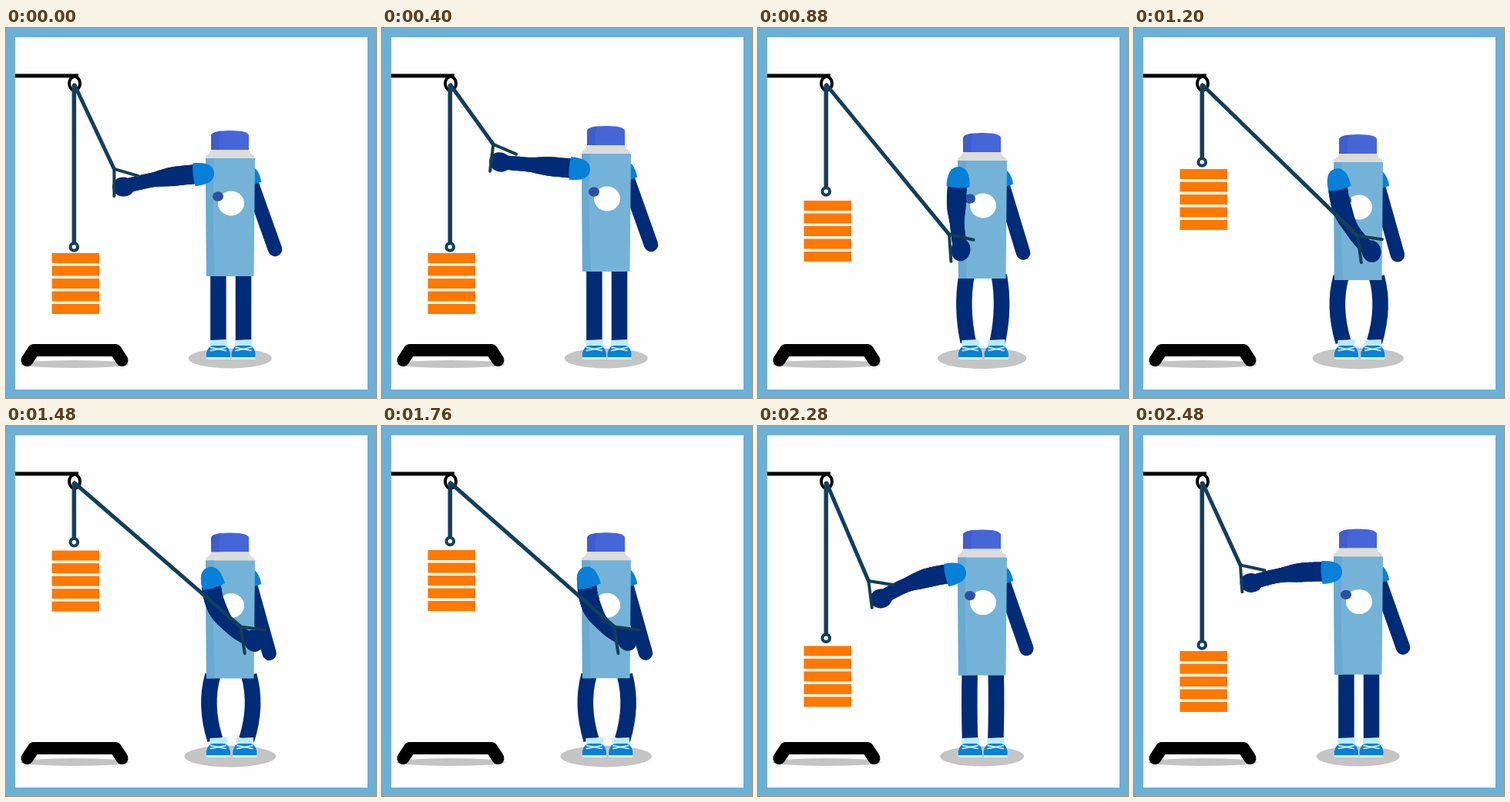
Animation of 480x480 px, one loop 2.52 s. Source, as an HTML page with a canvas:

```html
<!DOCTYPE html>
<html lang="en">
<head>
<meta charset="utf-8">
<title>Cable pull</title>
<style>
html, body { margin: 0; width: 100%; height: 100%; overflow: hidden; background: #6cb0d6; }
canvas { display: block; width: 480px; height: 480px; }
</style>
</head>
<body>
<canvas id="stage" width="480" height="480"></canvas>
<script>
const c = document.getElementById('stage').getContext('2d');
const LOOP = 2520, STEP = 40, RAD = Math.PI / 180;
const NAVY = '#002b76', BLUE = '#0780d8', ROPE = '#123f5c', STRAP = '#153e53';

// time, body drop, shoulder x, arm angle, arm reach, arm bend,
// knot offset x and y, handle turn, ring lift, brick lift, knee bow
const NAMES = ['drop', 'sx', 'angle', 'reach', 'bend', 'kx', 'ky', 'turn', 'ring', 'brick', 'bow'];
const KEYS = [
  [0, 0, 257, 80.8, 106, 3, -12, -23, 0, 0, 0, 0],
  [400, -6, 257, 95, 104, 0, -9, -23, 7, 0, 0, 0],
  [560, -3.5, 257, 74, 101, 2, -11, -22, 4, 5, 1, 1.5],
  [880, 3, 260, -1.8, 95, 4, -15, -20, -4, 72, 68, 8],
  [1200, 5, 264, -25, 104, 12, -18, -20, -8, 110, 109, 11.5],
  [1520, 5.5, 266, -34, 99, 17, -17, -18, -9, 134, 131, 12],
  [1760, 5.2, 266, -32.4, 97, 17, -17, -17, -9, 134.5, 131, 11.5],
  [2080, 3.4, 257, 42, 97, 8, -19, -21, -10, 55, 51, 3.5],
  [2360, 1, 257, 78, 105, 6, -15, -23, -6, 1, 0, 0.5],
  [2480, 0.4, 257, 82.4, 106, 5, -14, -23, -4, 0, 0, 0]
];
const N = KEYS.length;

function key(i) {
  const row = KEYS[(i + N) % N];
  return [row[0] + LOOP * Math.floor(i / N), ...row.slice(1)];
}

// Smooth curve through the keys, flat at each turning point
function pose(t) {
  let i = N - 1;
  while (KEYS[i][0] > t) i--;
  const [p, a, b, q] = [i - 1, i, i + 1, i + 2].map(key);
  const h = b[0] - a[0], u = (t - a[0]) / h, out = {};
  const slope = (x, y) => x * y <= 0 ? 0 : 2 * x * y / (x + y);
  NAMES.forEach((name, n) => {
    const j = n + 1;
    const rate = (from, to) => (to[j] - from[j]) / (to[0] - from[0]);
    const d = rate(a, b);
    const m0 = slope(rate(p, a), d) * h, m1 = slope(d, rate(b, q)) * h;
    const v = u * u * (3 - 2 * u);
    out[name] = a[j] + (b[j] - a[j]) * v + m0 * u * (1 - u) ** 2 - m1 * u * u * (1 - u);
  });
  return out;
}

function rect(x, y, w, h, fill) {
  c.fillStyle = fill;
  c.fillRect(x, y, w, h);
}

function oval(x, y, rx, ry, fill, turn = 0) {
  c.beginPath();
  c.ellipse(x, y, rx, ry, turn, 0, 7);
  c.fillStyle = fill;
  c.fill();
}

function ring(x, y, rx, ry, w, color) {
  oval(x, y, rx, ry, '#fefefe');
  c.lineWidth = w;
  c.strokeStyle = color;
  c.stroke();
}

function line(points, w, color, cap = 'round') {
  c.beginPath();
  points.forEach(p => c.lineTo(...p));
  c.lineWidth = w;
  c.strokeStyle = color;
  c.lineCap = cap;
  c.lineJoin = 'round';
  c.stroke();
}

function shape(d, fill) {
  c.fillStyle = fill;
  c.fill(new Path2D(d));
}

function sleeve(x, y, deg, scale = 1) {
  c.save();
  c.translate(x, y);
  c.rotate(deg * RAD);
  c.scale(scale, scale);
  shape('M-15 13C-15 -4 -10 -13 0 -13S15 -4 15 13Q0 16 -15 13Z', BLUE);
  c.restore();
}

function gym(p) {
  oval(89, 436, 70, 5, '#c4c4c4');
  line([[27.5, 431], [36, 418], [142, 418], [150.5, 431]], 16, '#000');
  line([[12, 62], [94, 62]], 5, '#050505', 'butt');
  ring(89, 72, 7, 9, 4, '#050505');
  for (let i = 0; i < 5; i++) rect(59.5, 292 - p.brick + i * 16.5, 61.5, 13, '#ff7800');
  const y = 284 - p.ring;
  line([[88.3, 75], [88.3, y - 6]], 5.5, ROPE);
  ring(88.3, y, 4.8, 4.8, 4, ROPE);
}

function leg(side, p) {
  const x = 291.7 + side * 16.3, at = k => x + side * p.bow * k;
  const top = at(0.6), mid = at(1), foot = at(0.35);
  c.beginPath();
  c.moveTo(top, 318 + p.drop);
  c.quadraticCurveTo(2 * mid - (top + foot) / 2, 362, foot, 407);
  c.lineWidth = 20.5;
  c.strokeStyle = NAVY;
  c.lineCap = 'butt';
  c.stroke();

  c.save();
  c.translate(x + (side > 0 ? p.bow * 0.15 : 0), 0);
  shape('M-11 405L11 404 12 415H-11Z', '#b9edf8');
  rect(-15.5, 425, 31, 5, '#d9eef7');
  shape('M-15.5 427V422Q-13 412 -7 412H8Q14 414 15.5 422V427Z', BLUE);
  line([[-10, 414.5], [10, 418.5]], 1.6, '#e8faff');
  line([[-10, 418.5], [10, 414.5]], 1.6, '#e8faff');
  c.restore();
}

function bottle(p) {
  c.save();
  c.translate(0, p.drop);
  shape('M266 158V139Q268 133 290.5 133T315 139V158Z', '#4666d8');
  shape('M266 158V139Q268 135 279 134Q276 143 277 158Z', '#3f5dcd');
  shape('M266 158H315Q316 163 322 166V170H259V166Q265 163 266 158Z', '#dcdcdc');
  shape('M259 169H323L321.5 322H260Z', '#74b3d7');
  shape('M259 169H270Q267 240 271 322H260Z', '#68aad1');
  oval(292, 227.5, 17, 16, '#fff');
  oval(275, 218.5, 7, 6.2, '#2d4fa3');
  c.restore();
}

function farArm(p) {
  const hand = [349 - p.bow * 0.62, 287 + p.drop + p.bow * 0.2];
  line([[317 - p.bow * 0.1, 197 + p.drop], hand], 18.5, NAVY);
  sleeve(316, 191 + p.drop, -12, 0.88);
}

function nearArm(p) {
  const sy = 189 + p.drop + p.bow * 0.12, a = p.angle * RAD;
  const sin = Math.sin(a), cos = Math.cos(a);
  const spot = u => {
    const along = p.reach * u, off = 4 * p.bend * u * (1 - u);
    return [p.sx - sin * along - cos * off, sy + cos * along - sin * off];
  };
  for (let i = 0; i < 30; i++) {
    const u = i / 30;
    const fade = Math.min(1, Math.max(0, (u - 0.32) / 0.33));
    line([spot(u), spot(u + 1 / 30)], 25 - 6.5 * fade * fade * (3 - 2 * fade), NAVY);
  }
  const [hx, hy] = spot(1);
  oval(hx, hy, 12.5, 14.5, NAVY, a + 0.2);
  sleeve(p.sx, sy, p.angle + p.bend);

  const x = hx + p.kx, y = hy + p.ky;
  line([[89, 74], [x, y]], 5, ROPE);
  c.save();
  c.translate(x, y);
  c.rotate(p.turn * RAD);
  line([[31, 9], [0, 0], [0, 35]], 4, STRAP);
  c.restore();
}

function draw(t) {
  const p = pose(t);
  rect(0, 0, 480, 480, '#6cb0d6');
  rect(12, 12, 457, 457, '#fefefe');
  gym(p);
  oval(290.7, 428.5, 54 + p.bow * 0.45, 13 + p.bow * 0.08, '#c5c5c5');
  leg(-1, p);
  leg(1, p);
  farArm(p);
  bottle(p);
  nearArm(p);
}

const start = performance.now();
function tick() {
  const t = (performance.now() - start) % LOOP;
  draw(Math.floor(t / STEP) * STEP);
  requestAnimationFrame(tick);
}
tick();
</script>
</body>
</html>
```
